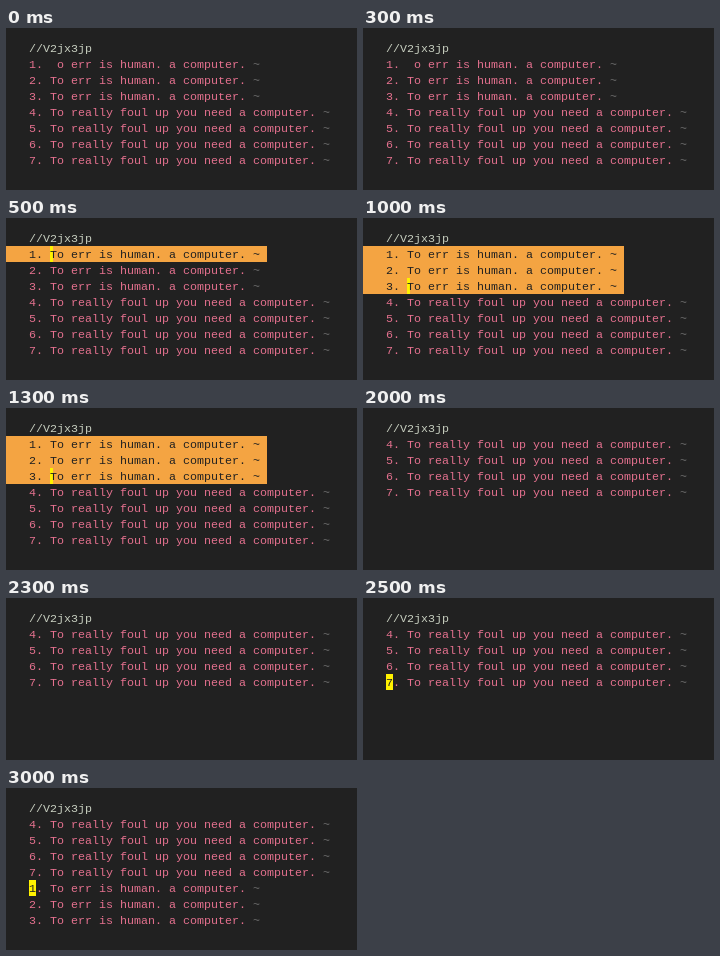
Animation, 351 px wide and 162 px high, one loop 3.5 s. Source, as an HTML page with a canvas:

```html
<!DOCTYPE html>
<html lang="en">
<head>
<meta charset="utf-8">
<title>Moving lines in an editor</title>
<style>
  html, body { margin: 0; width: 100%; height: 100%; overflow: hidden; background: #212121; }
  canvas { display: block; }
</style>
</head>
<body>
<canvas id="stage" width="351" height="162"></canvas>
<script>
const ctx = document.getElementById('stage').getContext('2d', { alpha: false });
const LEFT = 23, TOP = 12, COL = 7, ROW = 16, BASE = 12, STEP = 500;
const BG = '#212121', PLAIN = '#c8cfc0', PINK = '#e5718f', DIM = '#6c6c6c';
const ORANGE = '#f4a442', YELLOW = '#fff200';

const SHORT = 'To err is human. a computer.';
const LONG = 'To really foul up you need a computer.';
const lineText = n => `${n}. ${n < 4 ? SHORT : LONG} ~`;

// selected: number of highlighted lines; cursor: [row, column, width]; hidden: [row, column]
const ALL = [1, 2, 3, 4, 5, 6, 7], REST = [4, 5, 6, 7];
const steps = [
  { lines: ALL, hidden: [1, 3] },
  { lines: ALL, selected: 1, cursor: [1, 3, 3] },
  { lines: ALL, selected: 3, cursor: [3, 3, 3] },
  { lines: REST, cursor: [1, 0, COL] },
  { lines: REST },
  { lines: REST, cursor: [4, 0, COL] },
  { lines: [...REST, 1, 2, 3], cursor: [5, 0, COL] }
];

const colX = col => LEFT + col * COL;
const rowY = row => TOP + row * ROW;
const isAt = (spot, row, col) => spot && spot[0] === row && spot[1] === col;

function fill(color, x, y, w, h) {
  ctx.fillStyle = color;
  ctx.fillRect(x, y, w, h);
}

function write(text, row, colorAt) {
  [...text].forEach((ch, col) => {
    const color = colorAt(ch, col);
    if (!color) return;
    ctx.fillStyle = color;
    ctx.fillText(ch, colX(col), rowY(row) + BASE);
  });
}

function draw({ lines, selected = 0, cursor, hidden }) {
  fill(BG, 0, 0, 351, 162);
  ctx.font = '11.67px "Liberation Mono", monospace';
  if (selected) fill(ORANGE, 0, rowY(1), 261, selected * ROW);
  if (cursor) fill(YELLOW, colX(cursor[1]), rowY(cursor[0]), cursor[2], ROW);
  write('//V2jx3jp', 0, () => PLAIN);
  lines.forEach((n, i) => {
    const row = i + 1;
    write(lineText(n), row, (ch, col) => {
      if (isAt(hidden, row, col)) return null;
      if (row <= selected || isAt(cursor, row, col)) return BG;
      return ch === '~' ? DIM : PINK;
    });
  });
}

let shown = -1;
function tick() {
  const index = Math.floor(performance.now() / STEP) % steps.length;
  if (index !== shown) draw(steps[shown = index]);
  requestAnimationFrame(tick);
}
tick();
</script>
</body>
</html>
```
